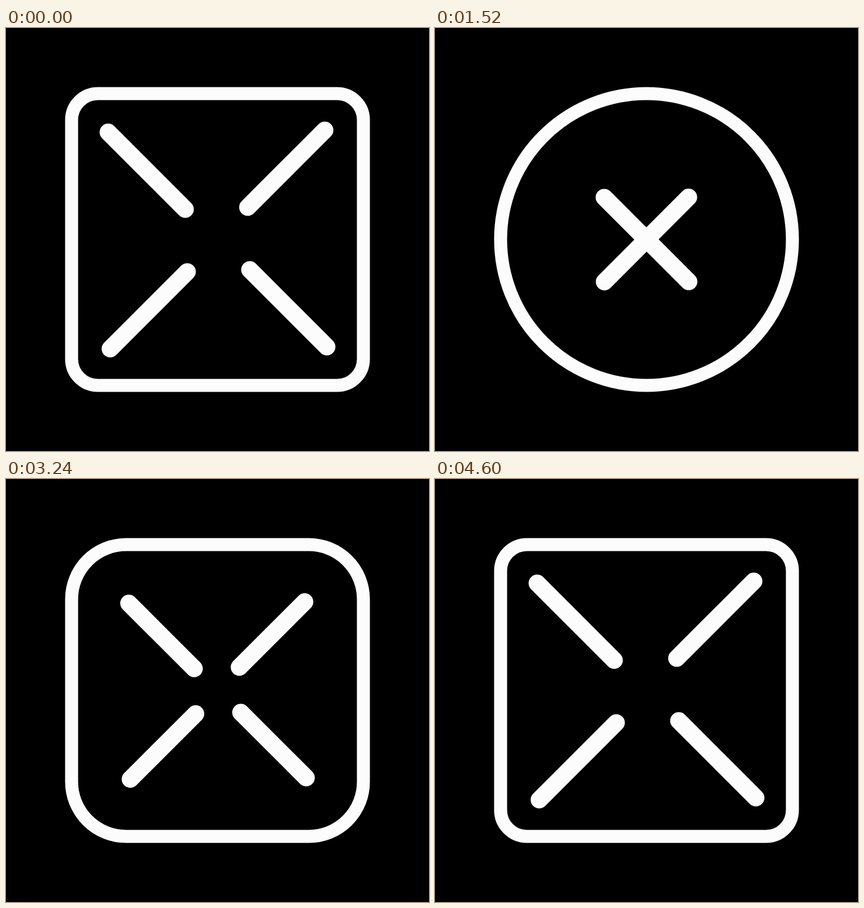
Write an HTML page that moves like this. It is 748 px wide and 748 px high and loops after 5000 ms.

```html
<!DOCTYPE html>
<html lang="en">
<head>
<meta charset="utf-8">
<title>Square to circle</title>
<style>
  html, body { margin: 0; width: 100%; height: 100%; overflow: hidden; background: #000; }
  svg { display: block; width: 100vw; height: 100vh; }
  svg * { fill: none; stroke: #fcfcfc; }
  line { stroke-width: 30.4; stroke-linecap: round; }
</style>
</head>
<body>
<svg viewBox="0 0 748 748">
  <rect id="frame" x="116" y="116" width="516" height="516" stroke-width="23"/>
  <g id="bars" transform="translate(374 374)"></g>
</svg>
<script>
const CYCLE = 2500, LOOP = 5000, STEP = 40;
const TURN = 1220, HALF = 880;          // turning point and length of each way
const OPEN = { x1: -193.3, y1: -189.7, x2: -57.1, y2: -53.5 };
const SHUT = { x1: -62, y1: -62, x2: 0, y2: 0 };
const ROUND = { open: 46.5, shut: 280, max: 258 };

const frame = document.getElementById('frame');
const group = document.getElementById('bars');
const bars = [0, 90, 180, 270].map(angle => {
  const bar = document.createElementNS('http://www.w3.org/2000/svg', 'line');
  bar.setAttribute('transform', `rotate(${angle})`);
  return group.appendChild(bar);
});

const mix = (a, b, p) => a + (b - a) * p;

// Symmetric cubic-bezier(k, 0, 1 - k, 1), solved by bisection.
function ease(x, k) {
  if (x <= 0) return 0;
  if (x >= 1) return 1;
  let lo = 0, hi = 1;
  for (let i = 0; i < 30; i++) {
    const s = (lo + hi) / 2, q = 1 - s;
    const bx = 3 * k * s * q * q + 3 * (1 - k) * s * s * q + s * s * s;
    if (bx < x) lo = s; else hi = s;
  }
  return lo * lo * (3 - 2 * lo);
}

function draw(time) {
  const phase = time % CYCLE;
  const away = Math.min(1, Math.abs(phase - TURN) / HALF);
  const barPos = ease(away, 0.85);
  const radius = mix(ROUND.shut, ROUND.open, ease(away, 0.95));

  frame.setAttribute('rx', Math.min(ROUND.max, radius));
  for (const bar of bars) {
    for (const key in OPEN) bar.setAttribute(key, mix(SHUT[key], OPEN[key], barPos));
  }
}

const start = performance.now();
function tick() {
  const time = (performance.now() - start) % LOOP;
  draw(Math.floor(time / STEP) * STEP);
  requestAnimationFrame(tick);
}
tick();
</script>
</body>
</html>
```
